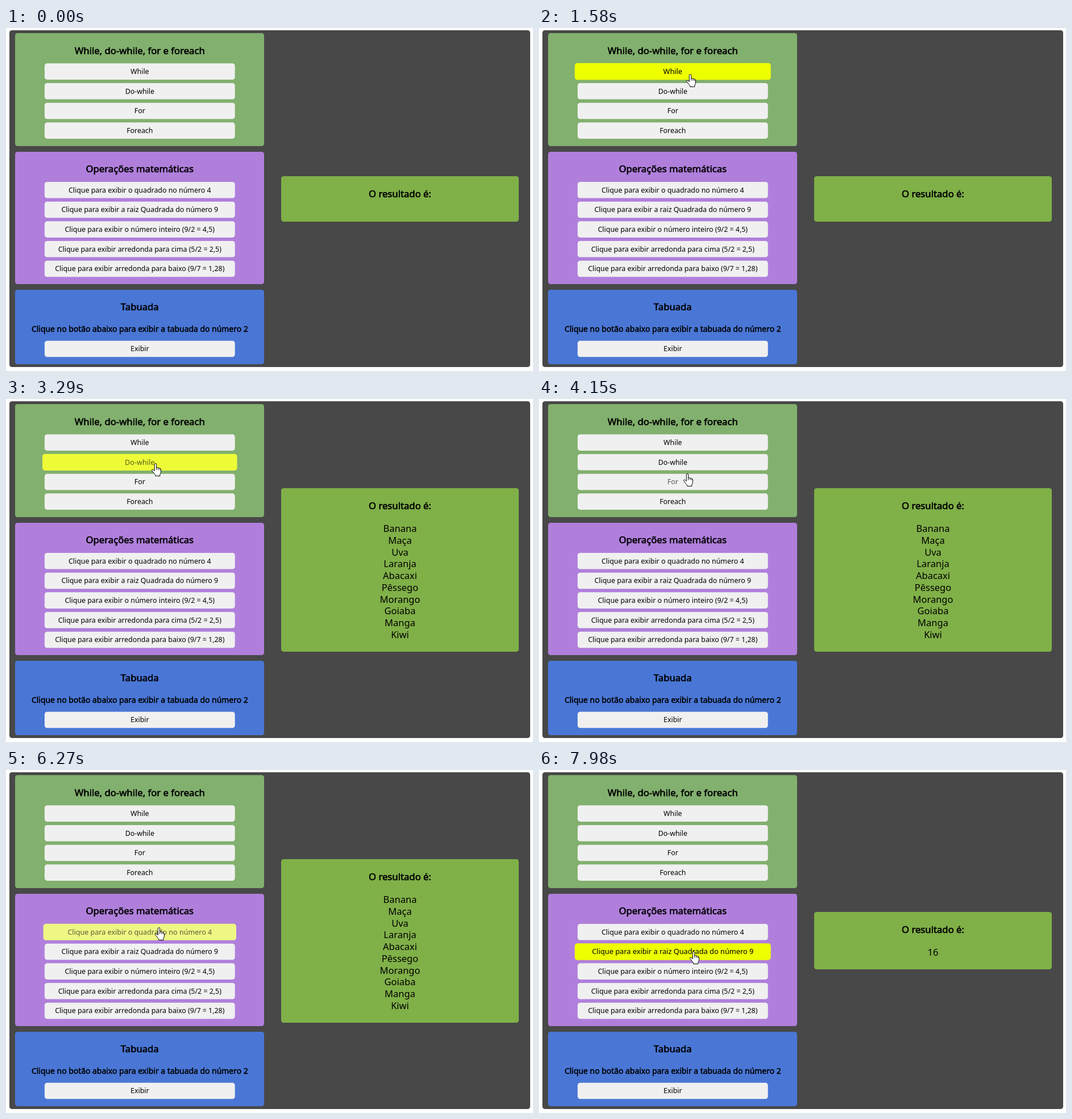
An HTML page for the animation above (8000 ms loop, 927 by 604 pixels).

```html
<!DOCTYPE html>
<html lang="pt">
<head>
<meta charset="utf-8">
<title>While, do-while, for e foreach</title>
<style>
  html, body { margin: 0; width: 100%; height: 100%; overflow: hidden; background: #fff; }
  svg { display: block; width: 927px; height: 604px; }
  text { font: 12.4px "Noto Sans", "Open Sans", sans-serif; text-anchor: middle; }
  .title { font-size: 16.7px; stroke: #000; stroke-width: .6px; }
  .note { font-size: 13.93px; stroke: #000; stroke-width: .5px; }
  .item { font-size: 16.5px; }
  .cursor { fill: #fff; stroke: #000; stroke-linejoin: round; }
</style>
</head>
<body>
<svg id="stage" viewBox="0 0 927 604"></svg>
<script>
const LOOP = 8000;
const stage = document.getElementById('stage');

function add(parent, tag, attrs, content) {
  const el = document.createElementNS('http://www.w3.org/2000/svg', tag);
  for (const k in attrs) el.setAttribute(k, attrs[k]);
  if (content) el.textContent = content;
  return parent.appendChild(el);
}
const box = (parent, x, y, width, height, fill) =>
  add(parent, 'rect', { x, y, width, height, fill, rx: 4.5 });
const label = (parent, x, y, str, cls) =>
  add(parent, 'text', { x, y, class: cls || '' }, str);

// Left column
const MID = 235.3, BTN_H = 28.6, STEP = 34.67;
const buttons = [];
function addButtons(top, names) {
  names.forEach((name, i) => {
    const y = top + i * STEP;
    const g = add(stage, 'g', {});
    buttons.push({
      g, cy: y + BTN_H / 2,
      rect: box(g, MID - 167.4, y, 334.8, BTN_H, '#f0f0f0'),
      text: label(g, MID, y + 18.6, name)
    });
  });
}

box(stage, 6, 4, 916, 593, '#484848');
box(stage, 16, 9, 438, 199, '#82b06e');
box(stage, 16, 218, 438, 233, '#b07fdc');
box(stage, 16, 461, 438, 131, '#4a77d6');
label(stage, MID, 45.5, 'While, do-while, for e foreach', 'title');
label(stage, MID, 254, 'Operações matemáticas', 'title');
label(stage, MID, 497, 'Tabuada', 'title');
label(stage, MID, 535, 'Clique no botão abaixo para exibir a tabuada do número 2', 'note');
addButtons(62.3, ['While', 'Do-while', 'For', 'Foreach']);
addButtons(271, [
  'Clique para exibir o quadrado no número 4',
  'Clique para exibir a raiz Quadrada do número 9',
  'Clique para exibir o número inteiro (9/2 = 4,5)',
  'Clique para exibir arredonda para cima (5/2 = 2,5)',
  'Clique para exibir arredonda para baixo (9/7 = 1,28)'
]);
addButtons(550.7, ['Exibir']);

// Result panels, one visible at a time
function addResult(from, y, height, items) {
  const g = add(stage, 'g', {});
  box(g, 484, y, 418, height, '#80b048');
  label(g, 693, y + 36.5, 'O resultado é:', 'title');
  items.forEach((s, i) => label(g, 693, y + 77 + i * 20.78, s, 'item'));
  return { g, from };
}
const results = [
  addResult(0, 261, 80, []),
  addResult(2240, 157, 288, ['Banana', 'Maça', 'Uva', 'Laranja', 'Abacaxi',
    'Pêssego', 'Morango', 'Goiaba', 'Manga', 'Kiwi']),
  addResult(6790, 250, 101, ['16'])
];

// Cursors, each with its hotspot at the origin
const arrow = add(stage, 'path', { class: 'cursor',
  d: 'M.5 .5V16.5L4.2 13 6.6 18.5 9 17.5 6.6 12.2H11.6Z' });
const hand = add(stage, 'path', { class: 'cursor',
  d: 'M-1.7 13.5V2.3a1.7 1.7 0 0 1 3.4 0V8.6q.3-1 1.6-1 1.5 0 1.7 1.4' +
     'q.4-.8 1.6-.6 1.2.2 1.3 1.4 1.6-.2 1.6 1.6V15q0 2.5-1.7 5V22.5H-.2V20.8' +
     'Q-2.7 18.5-4 16L-6.3 13.2Q-7 11.6-5.5 11.2-4.2 10.9-1.7 13.5Z' +
     'M1.7 8.6v3M5 9v2.8M7.9 9.8v2.2' });

// Cursor path: time, x, y
const path = [
  [70, 535, 436], [510, 535, 436], [750, 490, 372], [1000, 370, 202],
  [1160, 286, 91], [1310, 267, 84], [1580, 266, 81], [2240, 266, 81],
  [2300, 259, 76], [3080, 259, 76], [3150, 260, 97], [3290, 263, 113],
  [3930, 262, 113], [4150, 261, 131], [4400, 259, 148], [4750, 258, 160],
  [4822, 258, 166], [4950, 257, 170], [5140, 256, 159], [5390, 256, 159],
  [5540, 251, 158], [5850, 251, 158], [6190, 268, 268], [6270, 269, 277],
  [6660, 264, 281], [6780, 270, 281], [7300, 270, 281], [7560, 271, 306],
  [7980, 272, 319]
];

// Hovered button: start, end, index
const hovers = [
  [1160, 3150, 0], [3150, 4150, 1], [4150, 4822, 2],
  [4822, 5900, 3], [6190, 7470, 4], [7560, LOOP, 5]
];

const mix = (a, b, p) => a + (b - a) * p;

// The CSS "ease" curve
function ease(x) {
  if (x >= 1) return 1;
  const curve = (a, b, s) => 3 * a * s * (1 - s) ** 2 + 3 * b * s * s * (1 - s) + s ** 3;
  let lo = 0, hi = 1;
  for (let i = 0; i < 20; i++) {
    const m = (lo + hi) / 2;
    if (curve(.25, .25, m) < x) lo = m; else hi = m;
  }
  return curve(.1, 1, lo);
}

function cursorAt(t) {
  const i = path.findIndex(k => k[0] > t);
  if (i < 0) return path[path.length - 1].slice(1);
  if (i === 0) return path[0].slice(1);
  const a = path[i - 1], b = path[i];
  const p = (t - a[0]) / (b[0] - a[0]);
  return [mix(a[1], b[1], p), mix(a[2], b[2], p)];
}

function paintButton(b, p) {
  const s = 1 + .03 * p;
  b.g.setAttribute('transform',
    `translate(${MID} ${b.cy}) scale(${s}) translate(${-MID} ${-b.cy})`);
  b.rect.setAttribute('fill',
    `rgb(${Math.round(mix(240, 238, p))},${Math.round(mix(240, 255, p))},${Math.round(mix(240, 0, p))})`);
  b.text.setAttribute('opacity', p > 0 && p < 1 ? .62 : 1);
}

function draw(t) {
  const hover = hovers.find(h => t >= h[0] && t < h[1]);
  buttons.forEach((b, i) =>
    paintButton(b, hover && hover[2] === i ? ease((t - hover[0]) / 300) : 0));

  const current = results.filter(r => r.from <= t).pop();
  results.forEach(r => r.g.setAttribute('visibility', r === current ? 'visible' : 'hidden'));

  const [x, y] = cursorAt(t);
  const shown = t < 70 ? null : hover ? hand : arrow;
  for (const c of [arrow, hand]) {
    c.setAttribute('visibility', c === shown ? 'visible' : 'hidden');
    c.setAttribute('transform', `translate(${x} ${y})`);
  }
}

const start = performance.now();
function tick() {
  draw((performance.now() - start) % LOOP);
  requestAnimationFrame(tick);
}
draw(0);
requestAnimationFrame(tick);
</script>
</body>
</html>
```
